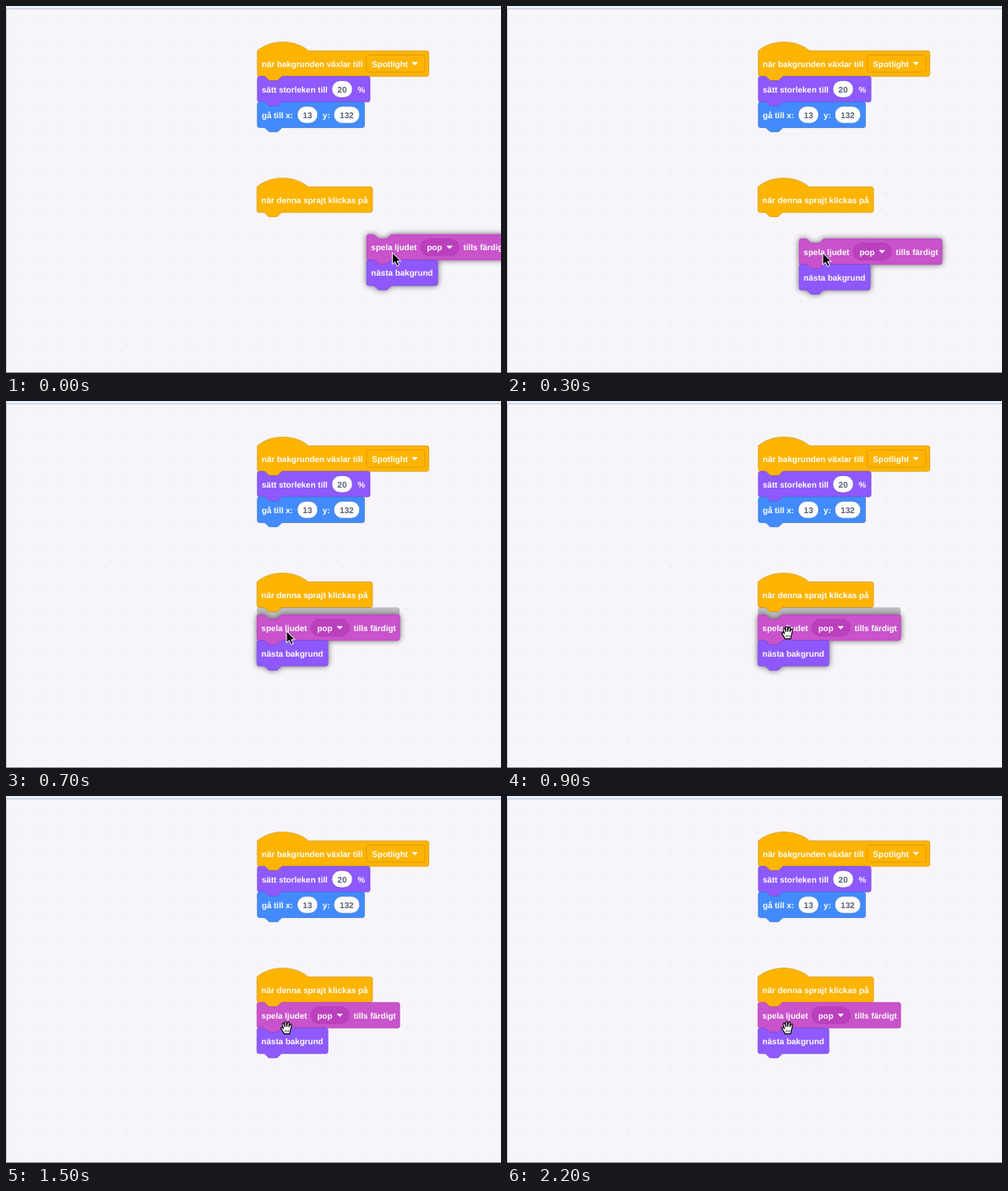
These frames come from a looping animation (600 px wide and 445 px high, 2.3 s). An HTML page:

```html
<!DOCTYPE html>
<html lang="sv">
<head>
<meta charset="utf-8">
<style>
html, body { margin: 0; width: 100%; height: 100%; overflow: hidden; background: #f7f5f9; }
svg { display: block; width: 600px; height: 445px; }
text { font: bold 10.05px "Liberation Sans", Arial, sans-serif; fill: #fff; text-rendering: geometricPrecision; white-space: pre; }
.value { fill: #575e75; text-anchor: middle; }
</style>
</head>
<body>
<svg viewBox="0 0 600 445">
  <defs>
    <pattern id="dots" x="2" y="4" width="26.2" height="26.2" patternUnits="userSpaceOnUse">
      <rect x="12.6" y="12.6" width="1.3" height="1.3" fill="#dedce1"/>
    </pattern>
    <filter id="shadow" x="-30%" y="-50%" width="160%" height="200%">
      <feGaussianBlur in="SourceAlpha" stdDeviation="3.5"/>
      <feComponentTransfer><feFuncA type="linear" slope=".6"/></feComponentTransfer>
      <feMerge><feMergeNode/><feMergeNode in="SourceGraphic"/></feMerge>
    </filter>
  </defs>
  <rect width="600" height="445" fill="#f7f5f9"/>
  <rect width="600" height="445" fill="url(#dots)"/>
  <rect width="600" height="3" fill="#e6effe"/>
  <path d="M.5 445V3.5H600" fill="none" stroke="#c3c9d6"/>
  <path d="M0 444.5H600" stroke="#8b8b90"/>
  <g id="fixed"></g>
  <g id="ghost"></g>
  <g id="dragged"></g>
  <g id="arrow">
    <path d="M0 0V14.2L3.3 11.2L5.6 16.4L8.2 15.2L5.9 10.2H10.3Z" fill="#000" stroke="#fff" stroke-width="1" stroke-linejoin="round"/>
  </g>
  <g id="hand" transform="translate(332.3 272.8)">
    <path d="M4.6 15.6C4.2 13.6 2.6 12 1.2 9.6C.2 8 1.6 7.2 2.8 8.2L4 9.4L2.6 4.4C2 2.4 4 1.8 4.6 3.4L5.8 7L5.4 2C5.4 .3 7.4 .3 7.6 2L8 6.6L9 2.3C9.4 .8 11.2 1.1 11 2.8L10.6 7L12 4.6C12.8 3.2 14.4 3.9 13.9 5.4L12.8 9.5C12.2 12 11.8 13 11.6 15.6Z" fill="#fff" stroke="#000" stroke-width="1.1" stroke-linejoin="round"/>
    <path d="M6.1 11V13.6M8.1 11V13.6M10.1 11V13.6" stroke="#000" stroke-width=".7"/>
  </g>
</svg>
<script>
const SCALE = 0.646, LOOP = 2300, STEP = 100;
const ORANGE = ['#ffb400', '#d0930c'], PURPLE = ['#8e59ff', '#7045d0'];
const BLUE = ['#428bff', '#2f6acb'], PINK = ['#c853ca', '#b23cb5'];
const $ = id => document.getElementById(id);

function blockPath(width, hat) {
  const w = width / SCALE - 4;
  const top = hat
    ? `M0 0c25-22 71-22 96 0H${w}`
    : `M0 4A4 4 0 0 1 4 0H12c2 0 3 1 4 2l4 4c1 1 2 2 4 2h12c2 0 3-1 4-2l4-4c1-1 2-2 4-2H${w}`;
  return top + 'a4 4 0 0 1 4 4v40a4 4 0 0 1-4 4H48c-2 0-3 1-4 2l-4 4c-1 1-2 2-4 2h-12' +
    'c-2 0-3-1-4-2l-4-4c-1-1-2-2-4-2H4a4 4 0 0 1-4-4z';
}

const shape = (x, y, width, attrs, hat) =>
  `<path transform="translate(${x} ${y}) scale(${SCALE})" d="${blockPath(width, hat)}" ${attrs}/>`;
const block = (x, y, width, [fill, edge], hat) =>
  shape(x, y, width, `fill="${fill}" stroke="${edge}"`, hat);
const label = (x, y, text) => `<text x="${x}" y="${y + 19.3}">${text}</text>`;
const field = (x, y, width, radius, fill, edge) =>
  `<rect x="${x}" y="${y + 5.2}" width="${width}" height="20.6" rx="${radius}" fill="${fill}" stroke="${edge}" stroke-width=".7"/>`;
const number = (cx, y, width, text, edge) =>
  field(cx - width / 2, y, width, 10.3, '#fff', edge) +
  `<text class="value" x="${cx}" y="${y + 19.3}">${text}</text>`;
const caret = (cx, y) =>
  `<path d="M${cx - 3} ${y + 14.1}h6l-3 3z" fill="#fff" stroke="#fff" stroke-linejoin="round"/>`;

$('fixed').innerHTML =
  block(304.7, 54.3, 207.8, ORANGE, true) +
  label(310, 54.3, 'när bakgrunden växlar till') +
  field(436.8, 54.3, 71, 2.6, ...ORANGE) + label(443.6, 54.3, 'Spotlight') + caret(495.6, 54.3) +
  block(304.7, 85.3, 136.5, PURPLE) +
  label(310, 85.3, 'sätt storleken till') + number(407.4, 85.3, 25, '20', PURPLE[1]) + label(426.3, 85.3, '%') +
  block(304.7, 116.4, 129.8, BLUE) +
  label(310, 116.4, 'gå till x:') + number(365.4, 116.4, 25, '13', BLUE[1]) +
  label(383.8, 116.4, 'y:') + number(413, 116.4, 31.5, '132', BLUE[1]) +
  block(304.2, 219.3, 140, ORANGE, true) +
  label(309.6, 219.3, 'när denna sprajt klickas på');

$('ghost').innerHTML = shape(304.2, 250.3, 173, 'fill="#000" fill-opacity=".23"');

$('dragged').innerHTML =
  block(304.2, 250.3, 173, PINK) +
  label(309.6, 250.3, 'spela ljudet') + field(369.5, 250.3, 46.5, 10.3, '#bb3fbe', PINK[1]) +
  label(377.2, 250.3, 'pop') + caret(404.6, 250.3) + label(421.3, 250.3, 'tills färdigt') +
  block(304.2, 281.3, 86, PURPLE) + label(309.6, 281.3, 'nästa bakgrund');

// One pose per step: block offset x, y, then pointer x, y.
const poses = [
  [133, 26.7, 468.3, 299], [115, 33, 446, 305], [85, 36, 415, 306], [50, 32, 382.8, 299.5],
  [26, 23, 362, 291], [9.8, 13.3, 349, 283], [1, 9.5, 341, 280], [0, 9, 340, 279]
];
const show = (id, visible) => $(id).setAttribute('visibility', visible ? 'visible' : 'hidden');
const move = (id, x, y) => $(id).setAttribute('transform', `translate(${x} ${y})`);

function render(ms) {
  const step = Math.floor((ms % LOOP) / STEP);
  const [x, y, px, py] = poses[Math.min(step, poses.length - 1)];
  const dropped = step >= 10, handShown = step >= 8;
  move('dragged', x, dropped ? 0 : y);
  $('dragged').setAttribute('filter', dropped ? 'none' : 'url(#shadow)');
  move('arrow', px, py);
  show('arrow', !handShown);
  show('hand', handShown);
  show('ghost', step >= 5 && !dropped);
}

const start = performance.now();
function tick() {
  render(performance.now() - start);
  requestAnimationFrame(tick);
}
tick();
</script>
</body>
</html>
```
